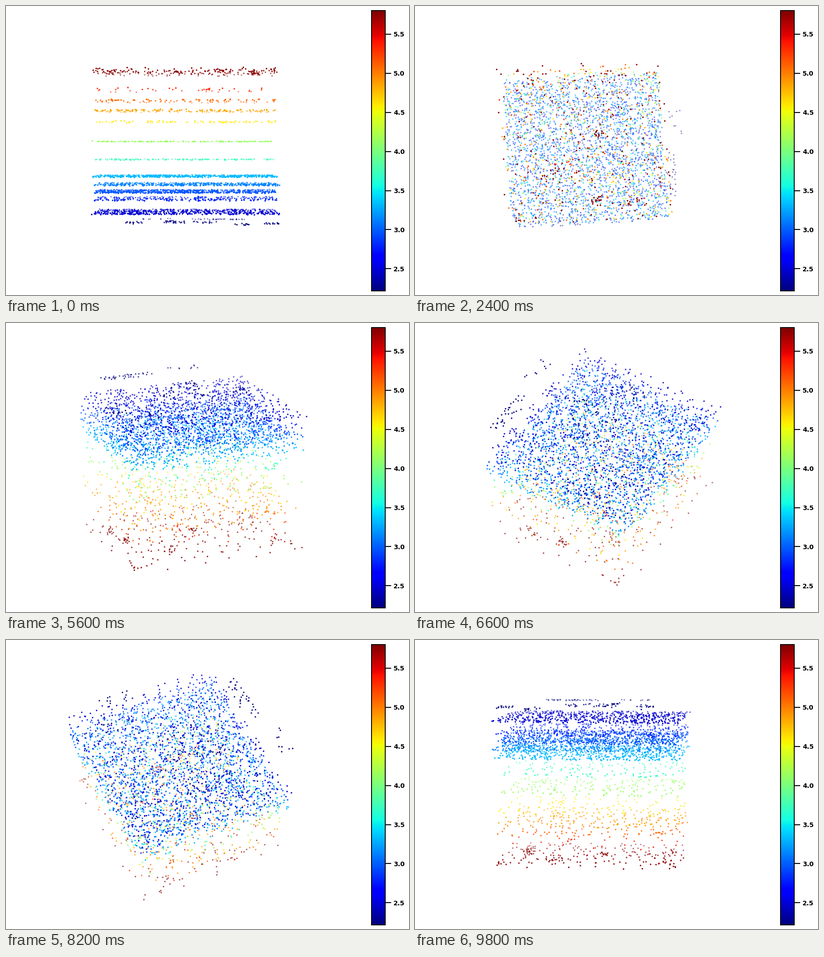
A matplotlib script that plays this animation: 882 by 635 pixels, repeating every 10 s.

```python
import numpy as np
import matplotlib.pyplot as plt
from matplotlib.animation import FuncAnimation
from matplotlib.cm import ScalarMappable
from matplotlib.colors import Normalize

W, H, DPI = 882, 635, 100
FRAMES, STEP = 50, 200
CX, CY = 394, 309          # screen centre of the cloud
UX, UY = 432, 364          # pixels per unit of the cube
DIST = 10                  # camera distance in cube units
Z_MIN, Z_MAX = 2.22, 5.8
EDGE = 0.4575              # data half width inside the unit cube
X_LOW = -0.355             # main block ends here, stray groups lie beyond

rng = np.random.default_rng(5)


def sheet(n, clumped=0.18, spread=0.045):
    """Points spread evenly over one layer, a part of them in loose clumps."""
    low, high = np.array([X_LOW, -EDGE]), np.array([EDGE, EDGE])
    # low-discrepancy steps with jitter keep the cover even
    steps = np.outer(np.arange(n), (0.7548777, 0.5698403))
    xy = low + (high - low) * ((steps + rng.random(2) + rng.normal(0, 0.03, (n, 2))) % 1)
    k = int(n * clumped)
    seeds = rng.uniform(low, high, (max(3, k // 5), 2))
    moved = seeds[rng.integers(len(seeds), size=k)] + rng.normal(0, spread, (k, 2))
    inside = ((moved > low) & (moved < high)).all(axis=1)
    xy[:k][inside] = moved[inside]
    return xy


def clump(x, y, n, sx=0.03, sy=0.03):
    xy = rng.normal((x, y), (sx, sy), (n, 2))
    return np.clip(xy, (X_LOW, -EDGE), (EDGE, EDGE))


def patch(x0, x1, y0, y1, n):
    return rng.uniform((x0, y0), (x1, y1), (n, 2))


def layer(xy, z, jitter=0.008):
    return np.column_stack([xy, z + rng.uniform(-jitter, jitter, len(xy))])


def build():
    sheets = [(5.34, 40), (5.08, 96), (4.85, 155), (4.59, 85), (4.13, 165),
              (3.71, 115), (3.32, 560), (3.13, 470), (2.96, 640),
              (2.79, 270), (2.48, 610)]
    top = np.vstack([
        sheet(170),
        clump(-0.02, -0.05, 12, 0.015, 0.012), clump(0.01, 0.33, 14, 0.015, 0.02),
        clump(-0.16, 0.36, 10, 0.03, 0.012), clump(0.40, 0.42, 6),
        clump(0.0, -0.38, 12, 0.07, 0.015), clump(0.2, 0.18, 14, 0.04, 0.02)])
    bottom = np.vstack([
        patch(-0.475, -0.395, -0.23, -0.07, 9), patch(-0.42, -0.35, 0.03, 0.31, 32),
        clump(-0.10, -0.08, 16, 0.04, 0.03), clump(0.08, -0.04, 10, 0.03, 0.04),
        clump(0.185, 0.43, 13, 0.06, 0.03), clump(0.05, -0.27, 14, 0.1, 0.03),
        clump(0.3, 0.27, 9, 0.06, 0.03), clump(-0.02, 0.1, 14, 0.08, 0.04)])
    parts = [layer(top, 5.76, 0.04), layer(bottom, Z_MIN + 0.008)]
    parts += [layer(sheet(n), z) for z, n in sheets]
    return np.vstack(parts)


cloud = build()
norm = Normalize(Z_MIN, Z_MAX)
base = plt.cm.jet(norm(cloud[:, 2]))
cube = cloud.copy()
cube[:, 2] = (norm(cloud[:, 2]) - 0.5) * 2 * EDGE


def view(angle):
    """Screen positions and depth with elevation and azimuth both at angle."""
    c, s = np.cos(angle), np.sin(angle)
    right = np.array([-s, c, 0])
    up = np.array([-s * c, -s * s, c])
    toward = np.array([c * c, c * s, s])
    if angle > 1.5 * np.pi:      # the up vector stays inverted to the end
        right, up = -right, -up
    depth = cube @ toward
    scale = 1 / (1 - depth / DIST)
    pos = np.column_stack([CX + UX * (cube @ right) * scale,
                           CY - UY * (cube @ up) * scale])
    return pos, depth


fig = plt.figure(figsize=(W / DPI, H / DPI), dpi=DPI, facecolor="white")
ax = fig.add_axes([0, 0, 1, 1])
ax.set_xlim(0, W)
ax.set_ylim(H, 0)
ax.axis("off")
dots = ax.scatter(cube[:, 0], cube[:, 1], s=2.1, c=base, linewidths=1)

cax = fig.add_axes([799.5 / W, 1 - 625.5 / H, 30.5 / W, 615.3 / H])
bar = fig.colorbar(ScalarMappable(norm, "jet"), cax=cax,
                   ticks=np.arange(2.5, 5.6, 0.5), format="%.1f")
bar.outline.set_linewidth(1.4)
cax.tick_params(length=9, width=1.5, pad=4, labelsize=10)
for label in cax.get_yticklabels():
    label.set_family("DejaVu Sans")
    label.set_weight("bold")


def draw(i):
    pos, depth = view(2 * np.pi * i / FRAMES)
    order = np.argsort(depth)
    near = (depth - depth.min()) / np.ptp(depth)
    colors = base.copy()
    colors[:, 3] = 0.3 + 0.7 * near
    dots.set_offsets(pos[order])
    dots.set_color(colors[order])
    return [dots]


anim = FuncAnimation(fig, draw, frames=FRAMES, interval=STEP,
                     init_func=lambda: draw(0), repeat=True, repeat_delay=0)
plt.show()
```
